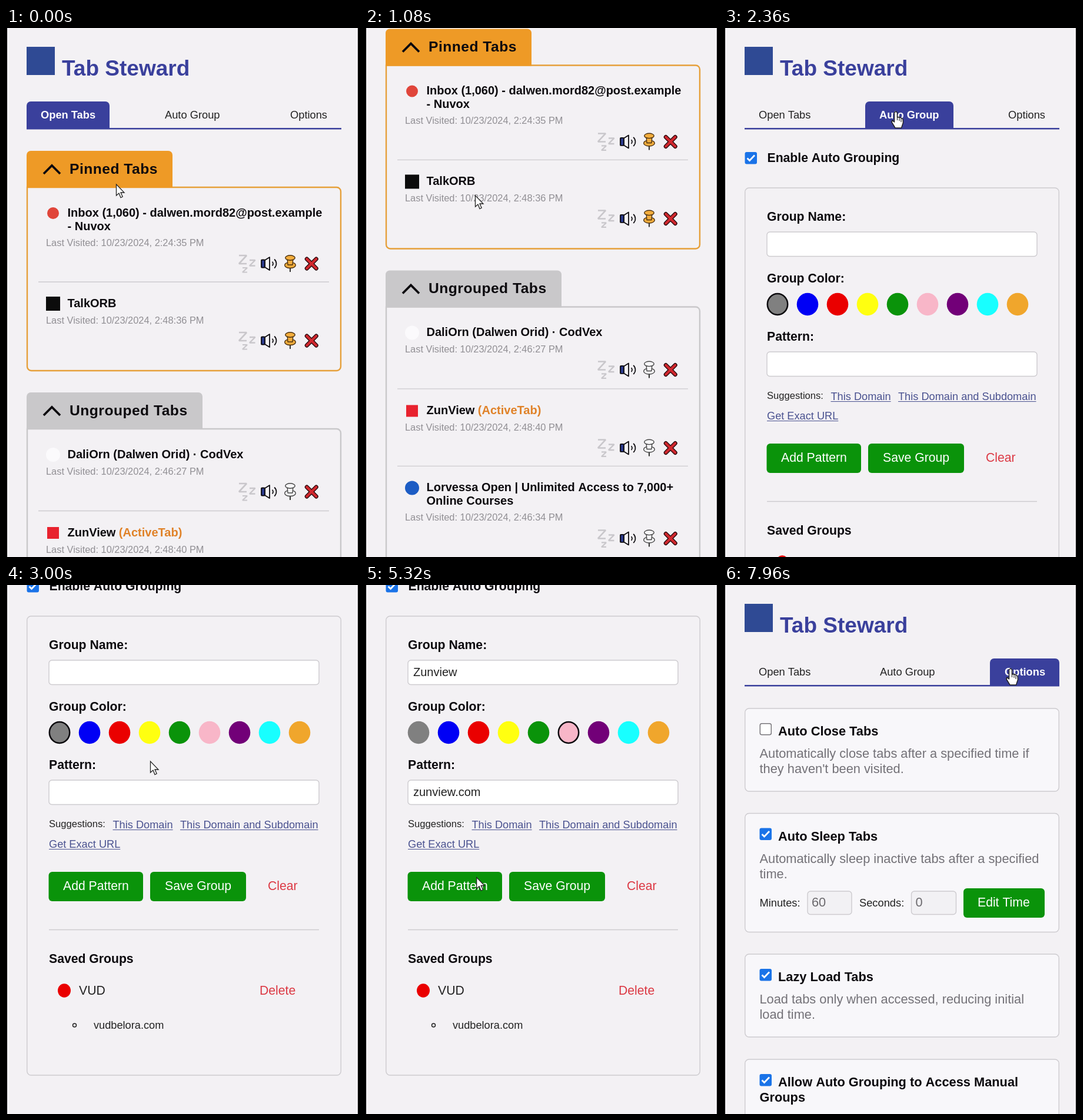
These frames come from a looping animation (600 px wide and 900 px high, 8000 ms). An HTML page with a canvas:

```html
<!DOCTYPE html>
<html lang="en">
<head>
<meta charset="utf-8">
<title>Tab Steward</title>
<style>
html, body { margin: 0; width: 100%; height: 100%; overflow: hidden; background: #f3f1f4; }
canvas { display: block; }
</style>
</head>
<body>
<canvas id="stage" width="600" height="900"></canvas>
<script>
const ctx = document.getElementById('stage').getContext('2d');
const LOOP = 8000, STEP = 40;
const INDIGO = '#3a409c', GREEN = '#0a930a', RED = '#dc3a45', INK = '#0c0a0e', RULE = '#cdcbcf';
const SWATCHES = ['#808080', '#0000f5', '#ea0000', '#ffff10', GREEN, '#f8b6c8', '#720078', '#18ffff', '#f0a62c'];
const PINK = 5;

// Moments at which the interface changes state
const AT = { autoPage: 2120, fill: 3480, focus: 3800, type: 4040, pink: 5000, add: 5440, save: 6040, options: 7680 };

const SCROLL = [[0, 0], [80, 0], [480, 444], [840, 444], [1300, 0], [2560, 0], [3000, 219], [6640, 219], [7160, 0]];
const POINTER = [
  [0, 187, 266, 'arrow'], [80, 187, 266, 'arrow'], [400, 187, 285, 'arrow'], [1600, 187, 285, 'arrow'],
  [2000, 292, 143, 'hand'], [2480, 292, 143, 'arrow'], [2760, 245, 300, 'arrow'], [3040, 245, 300, 'arrow'],
  [3340, 230, 408, 'hand'], [3520, 230, 408, 'arrow'], [3760, 186, 156, 'beam'], [4720, 186, 156, 'arrow'],
  [4960, 346, 250, 'hand'], [5080, 346, 250, 'arrow'], [5360, 180, 512, 'hand'], [5520, 180, 512, 'arrow'],
  [5840, 271, 554, 'hand'], [6040, 271, 554, 'arrow'], [6640, 271, 554, 'arrow'], [7160, 400, 330, 'arrow'],
  [7560, 487, 143, 'hand'], [8000, 487, 143, 'hand']
];

const ease = k => k * k * (3 - 2 * k);

function sample(keys, t) {
  let i = 0;
  while (i < keys.length - 1 && keys[i + 1][0] <= t) i++;
  const a = keys[i], b = keys[i + 1] || a;
  const k = b === a ? 0 : ease((t - a[0]) / (b[0] - a[0]));
  return a.slice(1).map((v, n) => typeof v === 'number' ? v + (b[n + 1] - v) * k : v);
}

function text(s, x, y, size, color = INK, bold = false) {
  ctx.font = `${bold ? 'bold ' : ''}${size}px "Liberation Sans", Arial, sans-serif`;
  ctx.fillStyle = color;
  ctx.fillText(s, x, y);
  return ctx.measureText(s).width;
}
const strong = (s, x, y, size, color) => text(s, x, y, size, color, true);

function paint(fill, stroke, width = 1.3) {
  if (fill) { ctx.fillStyle = fill; ctx.fill(); }
  if (stroke) { ctx.strokeStyle = stroke; ctx.lineWidth = width; ctx.stroke(); }
}
function box(x, y, w, h, r, fill, stroke, width) {
  ctx.beginPath();
  ctx.roundRect(x, y, w, h, r);
  paint(fill, stroke, width);
}
function oval(x, y, rx, ry, fill, stroke, width) {
  ctx.beginPath();
  ctx.ellipse(x, y, rx, ry, 0, 0, 7);
  paint(fill, stroke, width);
}
const dot = (x, y, r, fill, stroke, width) => oval(x, y, r, r, fill, stroke, width);

function path(points, fill, stroke, width, closed = false) {
  ctx.beginPath();
  points.forEach(([x, y]) => ctx.lineTo(x, y));
  if (closed) ctx.closePath();
  paint(fill, stroke, width);
}
const rule = (x1, x2, y, color = RULE, width = 1.3) => path([[x1, y], [x2, y]], null, color, width);

function at(x, y, draw) {
  ctx.save();
  ctx.translate(x, y);
  draw();
  ctx.restore();
}

function checkbox(x, y, on) {
  if (!on) return box(x + 0.8, y + 0.8, 19, 19, 3, '#fff', '#77757a', 1.5);
  box(x, y, 20.5, 20.5, 3, '#1a73e8');
  path([[x + 4, y + 10.5], [x + 8, y + 14.5], [x + 16.5, y + 5.5]], null, '#fff', 2.8);
}

function button(label, x, y, w, textX) {
  box(x, y, w, 50, 6, GREEN);
  text(label, textX, y + 31, 21.2, '#fff');
}

function header(page) {
  box(35, 32, 48, 48, 0, '#2f4a94');
  strong('Tab Steward', 95, 81, 37, INDIGO);
  rule(35, 570, 171.2, INDIGO, 2.4);
  const [left, width] = [[35, 141], [240, 150], [452, 118]][page];
  box(left, 125, width, 47, [7, 7, 0, 0], INDIGO);
  const labels = [['Open Tabs', 59], ['Auto Group', [270, 264, 265][page]], ['Options', page === 2 ? 477 : 483]];
  labels.forEach(([s, x], i) => text(s, x, 154, 18.3, i === page ? '#fff' : '#222', i === page));
}

function pin(pinned) {
  const fill = pinned ? '#f3ad3d' : '#f6f5f7', edge = pinned ? '#4a3010' : '#444';
  path([[0, 4], [0, 14]], null, '#333', 2);
  oval(0, 2.5, 9.3, 5, fill, edge, 1.4);
  path([[-5, -9], [-4, 2], [4, 2], [5, -9]], fill, edge, 1.4);
  oval(0, -10, 8.2, 4.2, fill, edge, 1.4);
}

function zed(x, y, w, h, weight) {
  path([[x, y], [x + w, y], [x, y + h], [x + w, y + h]], null, '#c9c7cb', weight);
}

function actions(y, pinned) {
  at(0, y, () => {
    ctx.lineJoin = 'bevel';
    zed(396, -14, 13, 14, 2.6);
    zed(414, -6, 9.5, 9.5, 2.4);
    zed(402, 7, 8, 7.5, 2.2);
    ctx.lineJoin = 'round';
    path([[440, -6], [448, -11], [448, 11], [440, 6]], '#f6f5f7', INK, 1.8, true);
    box(434, -6.5, 6, 13, 1, '#2b3a8c', INK, 1.8);
    [4.5, 10].forEach(r => {
      ctx.beginPath();
      ctx.arc(449.5, 0, r, -0.85, 0.85);
      paint(null, INK, 1.7);
    });
    at(483, 0, () => pin(pinned));
    ctx.lineCap = 'round';
    [['#2c0c10', 7], ['#d2282e', 4.2]].forEach(([color, width]) => {
      path([[511.3, -8], [527.3, 8]], null, color, width);
      path([[527.3, -8], [511.3, 8]], null, color, width);
    });
  });
}

function groupFrame(label, y, bottom, width, fill, edge = fill) {
  box(36, y + 62, 533, bottom - y - 63, [0, 7, 7, 7], null, edge, 2.4);
  box(35, y, width, 63, [7, 7, 0, 0], fill);
  path([[64, y + 39], [78, y + 25], [92, y + 39]], null, INK, 3.8);
  ctx.letterSpacing = '0.5px';
  strong(label, 108, y + 39, 24.6);
  ctx.letterSpacing = '0px';
}

function badge(y, color, size, round) {
  if (round) dot(80, y, size / 2, color);
  else box(80 - size / 2, y - size / 2, size, size, 0, color);
}

function tabItem(y, lines, time, pinned, mark, active) {
  badge(y - 6, ...mark);
  lines.forEach((s, i) => {
    const width = strong(s, 104.5, y + i * 23, 20);
    if (active) strong('(ActiveTab)', 110 + width, y, 20, '#e08228');
  });
  const end = y + (lines.length - 1) * 23;
  text(`Last Visited: 10/23/2024, ${time} PM`, 68, end + 29 - lines.length, 16.4, '#918f94');
  actions(end + 57, pinned);
}

function openPage() {
  groupFrame('Pinned Tabs', 209, 584, 248, '#ee9a26', '#e6a03a');
  tabItem(321, ['Inbox (1,060) - dalwen.mord82@post.example', '- Nuvox'], '2:24:35', true, ['#e0453a', 20, true]);
  rule(55, 549, 432);
  tabItem(475, ['TalkORB'], '2:48:36', true, ['#0c0c0c', 24, false]);

  groupFrame('Ungrouped Tabs', 620, 1128, 299, '#c9c8ca');
  tabItem(732, ['DaliOrn (Dalwen Orid) · CodVex'], '2:46:27', false, ['#fbfafc', 24, true]);
  rule(55, 549, 821.5);
  tabItem(865, ['ZunView'], '2:48:40', false, ['#e8222e', 20, false], true);
  rule(55, 549, 953);
  tabItem(996, ['Lorvessa Open | Unlimited Access to 7,000+', 'Online Courses'], '2:46:34', false, ['#1c5cc4', 24, true]);

  groupFrame('VUD', 1164, 1384, 197, '#ec0000', '#c81c30');
  path([[175, 1182], [175, 1206]], null, '#3a1010', 2.5);
  path([[204, 1194], [181, 1194]], null, '#3a1010', 2.5);
  path([[188, 1186], [180, 1194], [188, 1202]], null, '#3a1010', 2.5);
  tabItem(1276, ['VUD Belora | Unlock Your Tech Future'], '2:48:24', false, ['#2c2a2e', 14, false]);
}

function field(y, value, focused, t) {
  box(73, y, 459, 41.5, 5, '#fff', focused ? INK : RULE, focused ? 2.6 : 1.4);
  const width = text(value, 82, y + 27, 20, '#222');
  if (focused && (t - AT.focus) % 1000 < 500) path([[83 + width, y + 10], [83 + width, y + 31]], null, INK, 1.8);
}

function bullet(s, y) {
  dot(116.5, y - 6, 3, null, '#222', 1.5);
  text(s, 149, y, 18.2, '#222');
}

function savedGroup(name, domain, color, y) {
  oval(99, y, 11, 11.7, color);
  text(name, 124, y + 7, 21.2, '#222');
  text('Delete', 431, y + 7, 21.2, RED);
  bullet(domain, y + 65);
}

function link(s, x, y) {
  const width = text(s, x, y, 18.2, '#4a5290');
  rule(x, x + width, y + 2.5, '#4a5290', 1.2);
}

function autoPage(t) {
  const saved = t >= AT.save, pending = t >= AT.add && !saved;
  const shift = pending ? 50 : 0;
  const name = saved ? '' : 'Zunview'.slice(0, Math.max(0, Math.floor((t - AT.type) / 100) + 1));
  const picked = t >= AT.pink && !saved ? PINK : 0;

  checkbox(35.5, 211, true);
  strong('Enable Auto Grouping', 73.5, 228, 21.2);
  box(35.7, 272, 533.6, 781 + shift + (saved ? 147 : 0), 7, null, RULE, 1.4);
  strong('Group Name:', 73, 328, 21.2);
  field(347, name, t >= AT.focus && t < AT.pink, t);
  strong('Group Color:', 73, 433, 21.2);
  SWATCHES.forEach((color, i) => {
    const x = 91 + i * 51;
    if (i === picked) oval(x, 470, 17.2, 18, color, INK, 2.5);
    else oval(x, 470, 18.3, 19.2, color);
  });
  strong('Pattern:', 73, 532, 21.2);
  field(551, t >= AT.fill && t < AT.add ? 'zunview.com' : '', false, t);
  text('Suggestions:', 73, 631, 16.6, '#222');
  link('This Domain', 181.5, 633);
  link('This Domain and Subdomain', 296, 633);
  link('Get Exact URL', 73, 666);
  if (pending) bullet('zunview.com', 713);

  at(0, shift, () => {
    button('Add Pattern', 72.5, 707, 160.5, 97);
    button('Save Group', 245, 707, 163, 270);
    text('Clear', 445, 738, 21.2, RED);
    rule(73, 532, 805.5);
    strong('Saved Groups', 73, 862, 21.2);
    if (saved) {
      savedGroup('Zunview', 'zunview.com', SWATCHES[PINK], 909);
      rule(73, 532, 1016, '#dddbdf');
    }
    savedGroup('VUD', 'vudbelora.com', SWATCHES[2], saved ? 1056 : 909);
  });
}

function card(y, height, on, titles, lines) {
  box(35.7, y, 533.6, height, 7, '#f8f7fa', RULE, 1.4);
  checkbox(60.5, y + 25, on);
  titles.forEach((s, i) => strong(s, i ? 60.5 : 92, y + 46 + i * 26, 21.8));
  lines.forEach((s, i) => text(s, 60.5, y + 84 + i * 26, 21.8, '#737177'));
}

function numberField(label, x, value, left, width) {
  text(label, x, 547, 18.3, '#222');
  box(left, 521, width, 39.5, 5, '#f2f1f4', RULE, 1.4);
  text(value, left + 7, 547, 21.8, '#6c6a6e');
}

function optionsPage() {
  card(210, 141, false, ['Auto Close Tabs'],
    ['Automatically close tabs after a specified time if', "they haven't been visited."]);
  card(388.5, 202, true, ['Auto Sleep Tabs'], ['Automatically sleep inactive tabs after a specified', 'time.']);
  numberField('Minutes:', 60.5, '60', 142, 75);
  numberField('Seconds:', 230, '0', 318.5, 76);
  button('Edit Time', 407, 516, 138, 431);
  card(628, 141, true, ['Lazy Load Tabs'], ['Load tabs only when accessed, reducing initial', 'load time.']);
  card(807, 170, true, ['Allow Auto Grouping to Access Manual', 'Groups'], []);
}

const pointers = {
  arrow() {
    path([[0.5, 0], [0.5, 19], [5, 15], [8, 22.5], [11.2, 21], [8, 14], [14, 14]], '#fff', '#222', 1.3, true);
  },
  beam() {
    path([[-4, -9], [4, -9]], null, '#222', 1.4);
    path([[0, -9], [0, 10]], null, '#222', 1.4);
    path([[-4, 10], [4, 10]], null, '#222', 1.4);
  },
  hand() {
    ctx.lineJoin = 'round';
    path([[-2.5, 1], [0, -1], [2.5, 1], [2.5, 9], [6, 8.5], [9, 10], [12, 12], [12.5, 18], [9.5, 27],
      [-1, 27], [-7, 17], [-6, 14], [-2.5, 17]], '#fff', '#222', 1.5, true);
    [[2.5, 8], [6, 9], [9, 11]].forEach(([x, y]) => path([[x, y], [x, y + 6]], null, '#222', 1.1));
  }
};

function render(t) {
  const page = t < AT.autoPage ? 0 : t < AT.options ? 1 : 2;
  ctx.fillStyle = '#f3f1f4';
  ctx.fillRect(0, 0, 600, 900);
  at(0, -sample(SCROLL, t)[0], () => {
    header(page);
    [openPage, autoPage, optionsPage][page](t);
  });
  ctx.fillStyle = '#000';
  ctx.fillRect(0, 0, 2, 900);
  ctx.fillRect(598, 0, 2, 900);
  const [x, y, kind] = sample(POINTER, t);
  at(x, y, pointers[kind]);
}

const start = performance.now();
function tick() {
  const t = (performance.now() - start) % LOOP;
  render(Math.floor(t / STEP) * STEP);
  requestAnimationFrame(tick);
}
tick();
</script>
</body>
</html>
```
